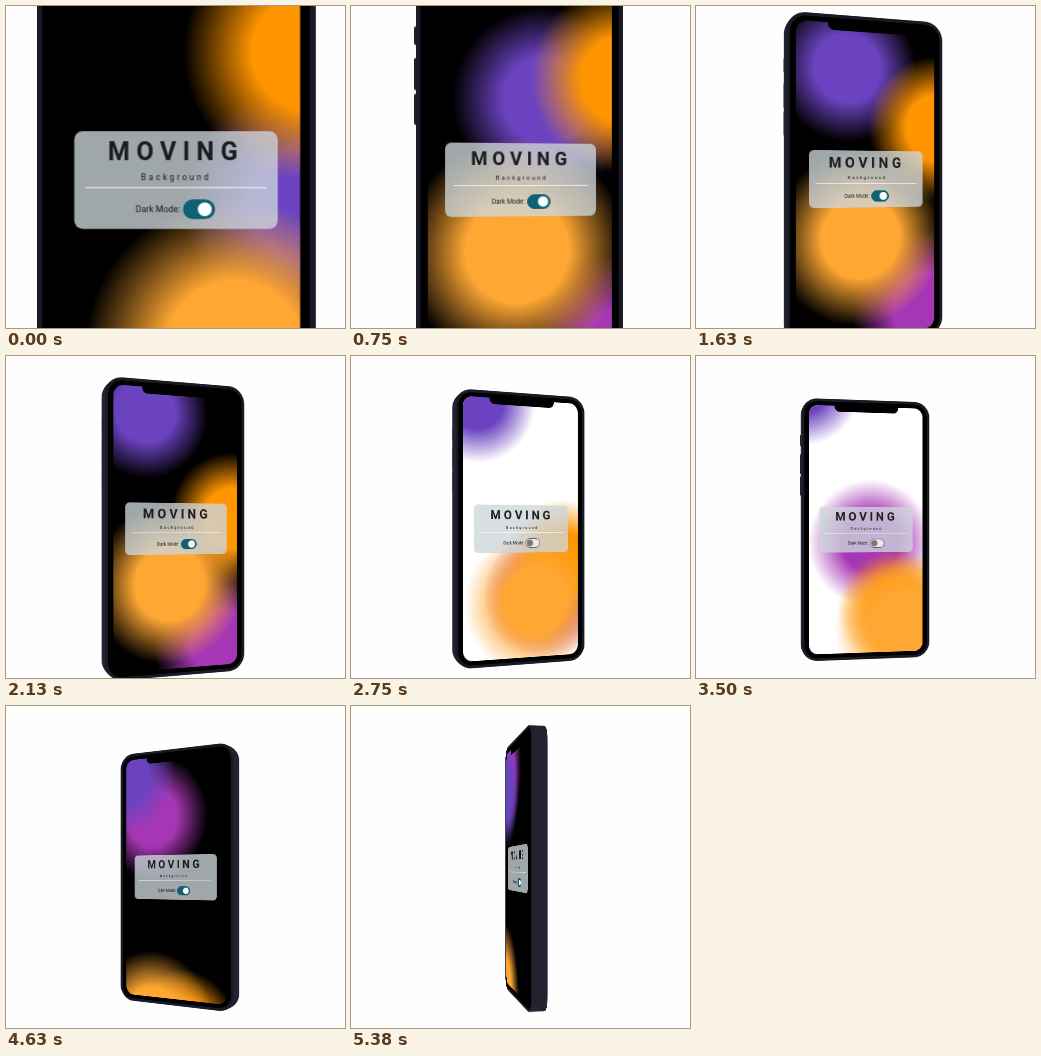
Animation, 339 px wide and 322 px high, one loop 5.51 s. Source, as an HTML page:

```html
<!DOCTYPE html>
<html lang="en">
<head>
<meta charset="utf-8">
<title>Moving background</title>
<style>
  html, body { margin: 0; width: 100%; height: 100%; overflow: hidden; background: #fefefe; }
  body { position: relative; font-family: Roboto, sans-serif; color: #1b1c1e; }
  div, i, span { position: absolute; box-sizing: border-box; white-space: nowrap; }
  .layer { left: -100px; top: -200px; width: 200px; height: 400px; border-radius: 24px; background: #232330; }
  #front { background: #1a1a27; }
  .button { width: 4px; border-radius: 2px; background: #20202d; }
  .bezel { inset: 4px; border-radius: 20px; background: #000; }
  .screen { inset: 10px 11px; border-radius: 14px; overflow: hidden; }
  .notch { left: 50px; top: 8px; width: 100px; height: 11px; border-radius: 0 0 8px 8px; background: #000; }
  .card { left: 27px; top: 165px; width: 146px; height: 70px; border-radius: 6px; background: rgba(205, 215, 220, .78); }
  .title, .subtitle { width: 100%; text-align: center; }
  .title { top: 4px; font: 700 18px/21px Roboto, sans-serif; letter-spacing: 4.6px; }
  .subtitle { top: 28.5px; font-size: 6px; line-height: 8px; letter-spacing: 1.85px; }
  .rule { left: 8px; top: 40px; width: 130px; height: 1px; background: rgba(255, 255, 255, .65); }
  .label { left: 44px; top: 51.5px; font-size: 6.3px; line-height: 8px; }
  .track { left: 78px; top: 48.5px; width: 23px; height: 14.5px; border-radius: 8px; border: 1px solid; }
  .knob { left: 79.8px; top: 50.5px; width: 10.5px; height: 10.5px; border-radius: 50%; }
</style>
</head>
<body>
<div class="layer" id="front">
  <div class="bezel"></div>
  <div class="screen" id="screen"></div>
  <div class="notch"></div>
  <div class="card">
    <div class="title">MOVING</div>
    <div class="subtitle">Background</div>
    <div class="rule"></div>
    <span class="label">Dark Mode:</span>
    <i class="track" id="track"></i>
    <i class="knob" id="knob"></i>
  </div>
</div>
<script>
const LOOP = 5510, STEP = 125, END = 43 * STEP;
const FRONT_Z = 6, THICKNESS = 22, SIDE_LAYERS = 12;
const [front, screenBox, track, knob] = ['front', 'screen', 'track', 'knob'].map(id => document.getElementById(id));

// Each path is a few [time, x, y] stops on the phone face
const BLOBS = [
  { color: '#a637b4', r: 98, path: [[0, 225, 375], [2130, 165, 360], [4630, 60, 105], [5380, 30, 45]] },
  { color: '#6b43c0', r: 90, path: [[0, 195, 218], [1000, 100, 92], [3500, 0, -18], [5380, 20, 75]] },
  { color: '#ff9500', r: 92, path: [[0, 197, 108], [1250, 203, 98], [5380, 100, 510]] },
  { color: '#ffa733', r: 108, path: [[0, 142, 322], [750, 96, 268], [2130, 90, 275], [3500, 158, 350],
    [4630, 62, 425], [5380, 5, 400]] }
];

function add(parent, className, style = {}) {
  const el = document.createElement('div');
  el.className = className;
  Object.assign(el.style, style);
  return parent.appendChild(el);
}

function addButton(parent, edge, top, height) {
  add(parent, 'button', { [edge]: '-2px', top: top + 'px', height: height + 'px' });
}

for (const blob of BLOBS) {
  const size = 2 * blob.r + 'px';
  blob.el = add(screenBox, '', { width: size, height: size,
    background: `radial-gradient(closest-side, ${blob.color} 46%, transparent)` });
}

// The body is a stack of rounded plates, listed from back to front
const plates = Array.from({ length: SIDE_LAYERS }, () => add(document.body, 'layer'));
plates.push(document.body.appendChild(front));
const middle = plates[SIDE_LAYERS / 2];
for (const [top, height] of [[54, 18], [84, 31], [118, 30]]) addButton(middle, 'left', top, height);
addButton(middle, 'right', 92, 48);

const ramp = (t, start, end) => Math.min(1, Math.max(0, (t - start) / (end - start)));
const lerp = (a, b, u) => a + (b - a) * u;
const mix = (a, b, u) => `rgb(${a.map((n, i) => Math.round(lerp(n, b[i], u)))})`;

function along(path, t) {
  let i = 1;
  while (i < path.length - 1 && t > path[i][0]) i++;
  const [t0, x0, y0] = path[i - 1], [t1, x1, y1] = path[i];
  const u = ramp(t, t0, t1);
  return [lerp(x0, x1, u), lerp(y0, y1, u)];
}

function draw(t) {
  // The phone backs away with an ease-out, turns a little, then swings round
  const u = t / END;
  const angle = 60 * u - 138 * u ** 3.6;
  const turned = Math.sin(angle * Math.PI / 180) ** 2;
  const scale = .632 + .743 * (1 - u) ** 4.1 + .025 * turned;
  const pose = `translate(170px, ${174 - 12 * turned}px) perspective(600px) ` +
    `scale3d(${scale}, ${scale}, ${scale}) rotateY(${angle}deg)`;
  plates.forEach((el, i) => {
    const z = FRONT_Z - THICKNESS * (1 - i / SIDE_LAYERS);
    el.style.transform = `${pose} translateZ(${z}px)`;
  });

  for (const { el, r, path } of BLOBS) {
    const [x, y] = along(path, t);
    el.style.transform = `translate(${x - r - 11}px, ${y - r - 10}px)`;
  }

  const light = ramp(t, 2450, 2750) - ramp(t, 4050, 4350);
  screenBox.style.background = mix([0, 0, 0], [255, 255, 255], light);
  track.style.background = mix([14, 98, 120], [232, 232, 234], light);
  track.style.borderColor = mix([14, 90, 110], [80, 80, 84], light);
  knob.style.background = mix([255, 255, 255], [120, 120, 124], light);
  knob.style.transform = `translateX(${8.6 * (1 - light)}px)`;
}

function tick() {
  const t = performance.now() % LOOP;
  draw(Math.min(END, Math.floor(t / STEP) * STEP));
  requestAnimationFrame(tick);
}
tick();
</script>
</body>
</html>
```
